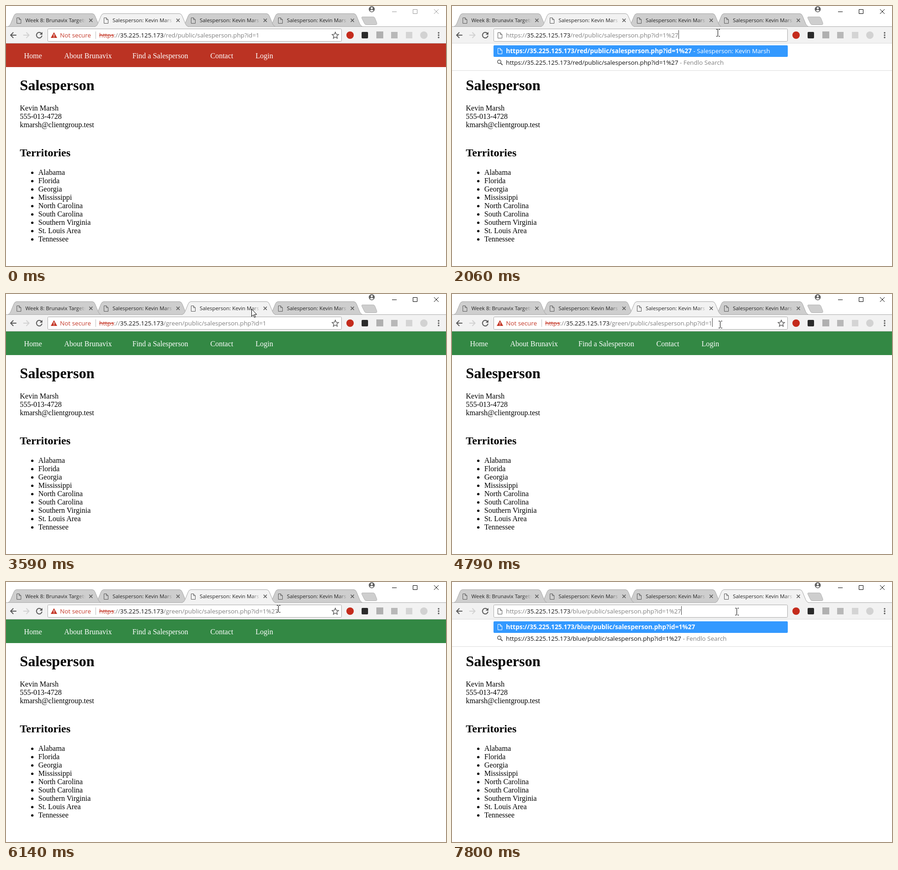
Animation, 954 px wide and 562 px high, one loop 8 s. Source, as an HTML page:

```html
<!DOCTYPE html>
<html lang="en">
<head>
<meta charset="utf-8">
<title>Salesperson pages</title>
<style>
  html, body { margin: 0; width: 100%; height: 100%; overflow: hidden; background: #fff; }
  svg { display: block; }
  text { white-space: pre; }
  .page { font: 16px "Liberation Serif", serif; }
  .ui { font: 13.3px "Open Sans", sans-serif; }
  .match { font-size: 13.62px; font-weight: bold; }
  .title { font: 11.37px "Open Sans", sans-serif; }
  .line { fill: none; stroke: #5a5a5a; }
</style>
</head>
<body>
<svg width="954" height="562" viewBox="0 0 954 562">
  <defs>
    <linearGradient id="fade" gradientUnits="userSpaceOnUse" x1="150" x2="169" y1="0" y2="0">
      <stop stop-color="#222"/><stop offset="1" stop-color="#222" stop-opacity="0"/>
    </linearGradient>
  </defs>
  <g id="scene"></g>
</svg>
<script>
const LOOP = 8000;
const HOST = '35.225.125.173', PERSON = 'Kevin Marsh', COMPANY = 'Brunavix';
const RED = '#c53929', GREY = '#808080', BLUE = '#3399ff';
const STATES = ['Alabama', 'Florida', 'Georgia', 'Mississippi', 'North Carolina',
  'South Carolina', 'Southern Virginia', 'St. Louis Area', 'Tennessee'];

// One entry per visited tab: when it opens and when each step of the edit happens.
const visits = [
  { name: 'red', color: '#bb3323', open: 0, select: 860, caret: 1780, typed: 2060, enter: 2520, done: 2980, known: true },
  { name: 'green', color: '#338844', open: 3450, select: 4230, caret: 4790, typed: 5070, enter: 5480, done: 5760, known: true },
  { name: 'blue', color: '#334488', open: 6350, select: 6910, caret: 7520, typed: 7800, enter: LOOP, done: LOOP }
];

// Pointer path: time, x, y
const path = [[70, 600, 575], [860, 576, 58], [3160, 576, 58], [3210, 545, 40], [3360, 545, 40],
  [3670, 530, 31], [3870, 530, 31], [4230, 581, 66], [6125, 581, 66], [6140, 590, 58],
  [6400, 626, 25], [6550, 626, 25], [6910, 617, 64]];

function pointerAt(t) {
  const i = path.findIndex(p => p[0] > t);
  if (i === 0) return path[0].slice(1);
  if (i < 0) return path[path.length - 1].slice(1);
  const [a, b] = [path[i - 1], path[i]];
  const u = (t - a[0]) / (b[0] - a[0]), e = u * u * (3 - 2 * u);
  return [1, 2].map(k => Math.round(a[k] + (b[k] - a[k]) * e));
}

const text = (x, y, s, attrs = '') => `<text x="${x}" y="${y}" ${attrs}>${s}</text>`;
const span = (s, attrs) => `<tspan ${attrs}>${s}</tspan>`;
const rect = (x, y, w, h, fill, attrs = '') =>
  `<rect x="${x}" y="${y}" width="${w}" height="${h}" fill="${fill}" ${attrs}/>`;
const line = (d, attrs = '') => `<path class="line" d="${d}" ${attrs}/>`;
const disc = (x, y, r, fill) => `<circle cx="${x}" cy="${y}" r="${r}" fill="${fill}"/>`;
const fileIcon = (x, y, color = '#5a5a5a') =>
  line(`M${x} ${y}h5l4 4v8h-9zM${x + 5} ${y}v4h4`, `style="stroke:${color}"`);

function page(color) {
  const nav = [['Home', 39], ['About ' + COMPANY, 126], ['Find a Salesperson', 274], ['Contact', 443], ['Login', 541]];
  return `<g class="page">${rect(0, 81, 954, 51, color)}
    <g fill="#fff">${nav.map(([s, x]) => text(x, 113, s)).join('')}</g>
    ${text(30, 182, 'Salesperson', 'font-size="32" font-weight="bold"')}
    ${[PERSON, '555-013-4728', 'kmarsh@clientgroup.test'].map((s, i) => text(30, 226 + 18 * i, s)).join('')}
    ${text(30, 325, 'Territories', 'font-size="24" font-weight="bold"')}
    ${STATES.map((s, i) => disc(57, 360.5 + 18 * i, 2.6, '#000') + text(70, 365 + 18 * i, s)).join('')}</g>`;
}

function tab(i, active, hover, t, loading) {
  const edge = 'M0 44.5q4 -1 6 -6l7 -17q2 -5 6 -5H183q4 0 6 5l7 17q2 5 6 6';
  const fill = active ? '#f2f2f2' : hover ? '#dedede' : '#cecece';
  const title = i === 0 ? `Week 8: ${COMPANY} Targets`
    : loading ? `https://${HOST}/r` : `Salesperson: ${PERSON}`.slice(0, 23);
  const icon = loading
    ? `<path d="M0 -6A6 6 0 0 1 5.2 3" fill="none" stroke="#7d9fd6" stroke-width="2"
        transform="translate(26 31) rotate(${(t - 2900) * .36 - 25})"/>`
    : fileIcon(19.5, 25.5);
  return `<g transform="translate(${4 + 189 * i} 0)">
    <path d="${edge}" fill="${fill}" stroke="#a6a6a6"/>
    ${active ? rect(1, 44, 200, 2, fill) : ''}
    ${icon}
    ${text(38, 35, title, 'class="title" fill="url(#fade)"')}
    ${line('M176.5 27.5l7 7m0 -7l-7 7', 'stroke-width="1.6"')}</g>`;
}

function browserTop(t, visit, current, pointer) {
  const loading = t >= visit.enter && t < visit.done;
  const overTab = pointer[1] < 45 ? Math.floor((pointer[0] - 12) / 189) : -1;
  const order = [3, 2, 1, 0].filter(i => i !== current);
  const tabs = order.map(i => tab(i, false, i === overTab, t, false)).join('');
  const ink = t < visits[0].select ? '#999' : '#000';
  return `${rect(0, 0, 954, 45, '#fff')}
    <path d="M773 23.5h23q3 0 4 3l4 10q1 4 -2 4h-20q-4 0 -5 -3l-5 -10q-2 -4 1 -4z" fill="#cecece" stroke="#b4b4b4"/>
    ${disc(793, 7, 6.5, '#5f5f5f')}${disc(793, 4.8, 2.2, '#fff')}
    <path d="M788.8 10.3q4.2 -4 8.4 0q-4.2 3.5 -8.4 0z" fill="#fff"/>
    <path d="M837 12.5h10M882.5 7.5h9v9h-9zM928 7l10 10m0 -10l-10 10" fill="none" stroke="${ink}"/>
    ${tabs}
    ${rect(0, 45, 954, 36, '#f2f2f2')}
    ${line('M0 44.5H954', 'style="stroke:#acacac"')}
    ${line('M0 80.5H954', 'style="stroke:#c4c4c4"')}
    ${tab(current, true, false, t, loading)}
    ${line('M22.5 63H10M16 57l-6 6 6 6', 'stroke-width="2"')}
    ${line('M37.5 63H50M44 57l6 6 -6 6', 'stroke-width="2" style="stroke:#d2d2d2"')}
    ${loading ? line('M67 58l10 10m0 -10l-10 10', 'stroke-width="2"')
      : line('M76.5 59A6 6 0 1 0 78 64', 'stroke-width="2"') + '<path d="M79 56v6h-6z" fill="#5a5a5a"/>'}
    ${disc(746, 63, 8, '#c42b1c')}${rect(771, 56, 14, 14, '#2b2b2b', 'rx="2"')}
    ${rect(803, 55, 15, 15, '#b0b0b0')}${rect(835, 56, 14, 14, '#b8b8b8')}
    ${rect(867, 56, 14, 14, '#d4d4d4')}${disc(906, 63, 8, '#d2d2d2')}
    ${[58, 63, 68].map(y => disc(938, y, 1.7, '#5a5a5a')).join('')}`;
}

// "Not secure" label with its middle left out while the chip is still opening
function chipLabel(p) {
  const full = 'Not secure';
  if (p >= 1) return full;
  const keep = Math.max(0, Math.floor(10 * p) - 2), head = Math.ceil(keep / 2);
  return full.slice(0, head) + '...' + full.slice(10 - (keep - head));
}

function addressBar(t, v) {
  const editing = t >= v.typed && t < v.enter;
  const selected = t >= v.select && t < v.caret;
  const caret = t >= v.caret && t < v.enter;
  const query = `/${v.name}/public/salesperson.php?id=1${t >= v.typed ? '%27' : ''}`;
  let open = 1;
  if (editing) open = 0;
  else if (t >= v.enter && t < v.done) {
    const u = Math.max(0, (t - v.done + 230) / 230);
    open = 1 - (1 - u) ** 3;
  }
  const x = Math.round(117 + 85 * open);
  const ink = c => `fill="${selected ? '#fff' : c}"`;
  const scheme = open
    ? span('https', ink(RED) + ' text-decoration="line-through"') + span('://', ink(GREY))
    : span('https://', ink(GREY));
  const chip = open
    ? `<path d="M104 56.5l7 12.5H97z" fill="${RED}"/>${rect(103.3, 61, 1.5, 4, '#fff')}${rect(103.3, 66, 1.5, 1.5, '#fff')}
       ${open > .3 ? text(117, 68, chipLabel(open), `fill="${RED}"`) : ''}
       ${rect(x - 8, 55, 1, 16, '#bdbdbd')}`
    : fileIcon(99.5, 57.5);
  const star = editing ? '' : line('M714 56.5l2 4.6 5 .5 -3.8 3.3 1.1 4.9 -4.3 -2.6 -4.3 2.6 1.1 -4.9 -3.8 -3.3 5 -.5z', 'stroke-width="1.4"');
  return `<g class="ui">${rect(90.5, 49.5, 637, 27, '#fff', 'stroke="#a9a9a9" rx="2"')}
    ${chip}${star}
    ${selected ? rect(x, 52, 0, 19, BLUE, 'id="mark"') : ''}
    ${text(x, 68, scheme + span(HOST, ink('#111')) + span(query, ink(GREY)), 'id="url"')}
    ${caret ? rect(x, 52, 1, 19, '#444', 'id="caret"') : ''}
    ${editing ? suggestions(`https://${HOST}${query}`, v.known) : ''}</g>`;
}

function suggestions(url, known) {
  return `${rect(0, 81, 954, 59, '#fff')}
    ${line('M0 80.5H954M0 139.5H954', 'style="stroke:#dcdcdc"')}
    ${rect(90, 85, 638, 25, BLUE, 'rx="2"')}${fileIcon(99.5, 91.5, '#fff')}
    ${text(117, 102, span(url, 'class="match"') + (known ? ` - Salesperson: ${PERSON}` : ''), 'fill="#fff"')}
    ${line('M105.5 123.5l4 4', 'stroke-width="2"')}<circle class="line" cx="102.5" cy="120.5" r="3.7" stroke-width="1.5"/>
    ${text(117, 127, url + span(' - Fendlo Search', `fill="${GREY}"`), 'fill="#111"')}`;
}

function pointerShape([x, y]) {
  const overBar = y > 47 && y < 80;
  return `<g transform="translate(${x} ${y})">` + (overBar
    ? '<path d="M-3.5 -7.5h3m2 0h3M.5 -7v14M-3.5 7.5h3m2 0h3" fill="none" stroke="#000" shape-rendering="crispEdges"/>'
    : '<path d="M.5 .5v16l3.7 -3.5 2.5 5.7 2.3 -1 -2.5 -5.5h5z" fill="#fff" stroke="#000"/>') + '</g>';
}

const scene = document.getElementById('scene');
let shown = '';

function draw(t) {
  const visit = visits.filter(v => t >= v.open).pop();
  const pointer = pointerAt(t);
  const markup = page(visit.color) + browserTop(t, visit, visits.indexOf(visit) + 1, pointer)
    + addressBar(t, visit) + pointerShape(pointer);
  if (markup === shown) return;
  scene.innerHTML = shown = markup;
  const find = id => scene.querySelector('#' + id);
  const url = find('url'), width = Math.round(url.getComputedTextLength());
  find('mark')?.setAttribute('width', width);
  find('caret')?.setAttribute('x', +url.getAttribute('x') + width);
}

const start = performance.now();
function tick() {
  draw((performance.now() - start) % LOOP);
  requestAnimationFrame(tick);
}
tick();
</script>
</body>
</html>
```
